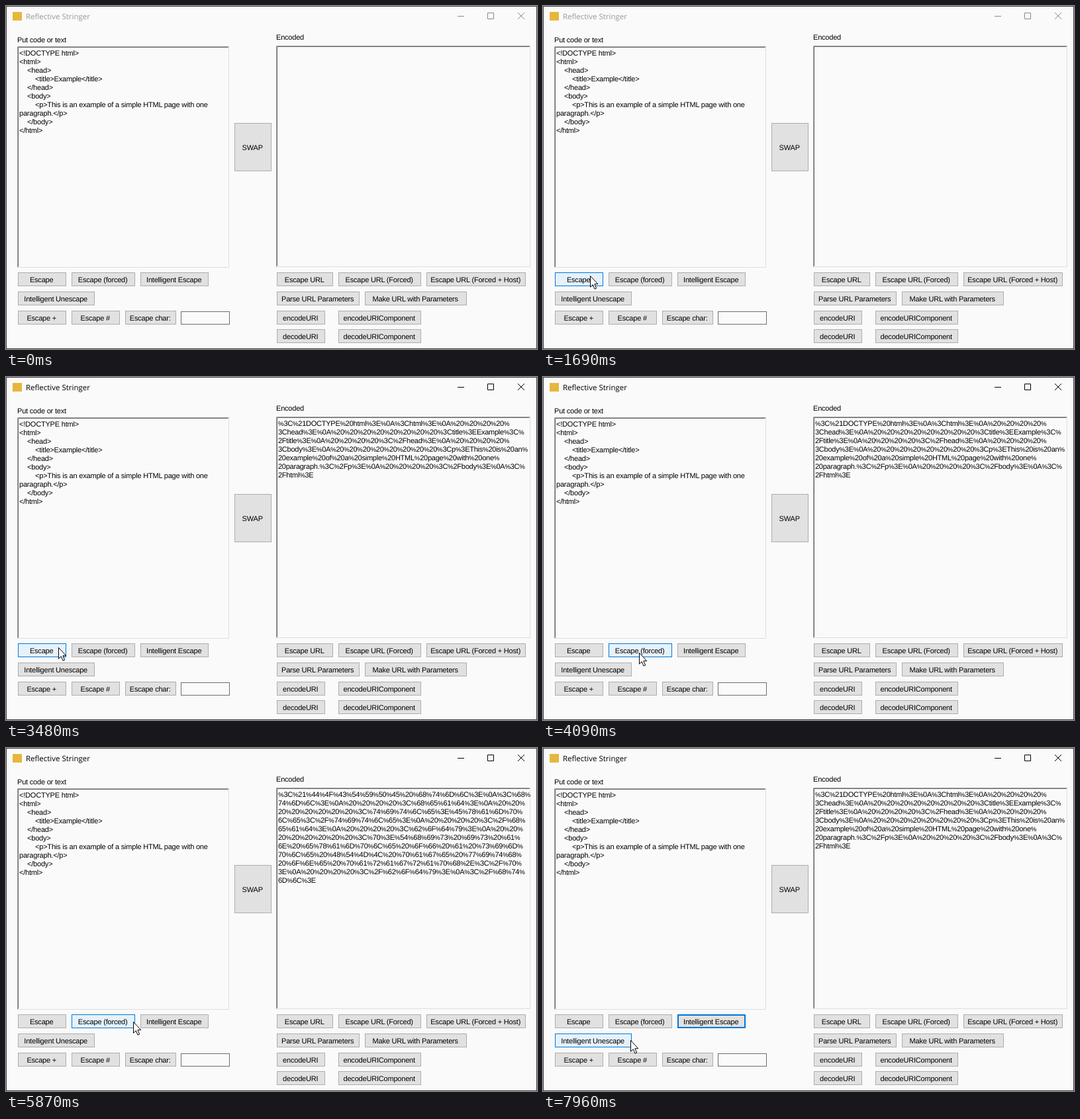
Write an HTML page that moves like this. It is 802 by 519 pixels and loops after 8000 ms.

```html
<!DOCTYPE html>
<html lang="en">
<head>
<meta charset="utf-8">
<title>Reflective Stringer</title>
<style>
html, body { margin: 0; width: 100%; height: 100%; overflow: hidden; background: #fafafa; }
svg { display: block; }
text {
  font: 11px "Liberation Sans", Arial, sans-serif;
  letter-spacing: -.2px;
  white-space: pre;
  text-rendering: geometricPrecision;
}
.output { letter-spacing: -.25px; }
.percent { font-size: 9.7px; }
.caption { font: 11.5px "Open Sans", sans-serif; letter-spacing: 0; }
.middle { text-anchor: middle; }
</style>
</head>
<body>
<svg id="stage" width="802" height="519" viewBox="0 0 802 519"></svg>
<script>
const stage = document.getElementById("stage");
const LOOP = 8000, SAMPLE = 78, PITCH = 13, GAP = 8;

function set(node, attrs) {
  for (const key in attrs) node.setAttribute(key, attrs[key]);
}
function add(tag, attrs, parent = stage) {
  const node = document.createElementNS("http://www.w3.org/2000/svg", tag);
  set(node, attrs);
  return parent.appendChild(node);
}
function label(x, y, content, className = "", parent = stage) {
  const node = add("text", { x, y, class: className }, parent);
  // Percent signs are set a little smaller than the other characters.
  for (const part of content.split(/(%)/)) {
    if (part === "%") add("tspan", { class: "percent" }, node).textContent = part;
    else node.append(part);
  }
  return node;
}
function show(node, visible) {
  node.style.display = visible ? "" : "none";
}

// Window frame and caption
add("rect", { x: .5, y: .5, width: 801, height: 518, fill: "#fafafa", stroke: "#3f3f3f" });
add("rect", { x: 10, y: 9, width: 14, height: 13, fill: "#e6b73c" });
const caption = label(30, 20, "Reflective Stringer", "caption");
const controls = add("path", {
  d: "M682 15.5h10M727.5 10.5h9v9h-9zM773 10l10 10m0 -10l-10 10",
  fill: "none"
});

// Text boxes
const boxes = [
  { x: 17, y: 61, w: 320, h: 335 },
  { x: 408, y: 60, w: 384, h: 335 }
];
for (const { x, y, w, h } of boxes) {
  const right = x + w - .5, bottom = y + h - .5;
  const bevel = (d, stroke) => add("path", { d, stroke, fill: "none" });
  bevel(`M${right} ${y}V${bottom}H${x}`, "#dedede");
  bevel(`M${x + .5} ${bottom}V${y + .5}H${right}`, "#a0a0a0");
  bevel(`M${x + 1.5} ${bottom - 1}V${y + 1.5}H${right - 1}`, "#696969");
}
add("rect", { x: 264.5, y: 462.5, width: 73, height: 19, fill: "#fafafa", stroke: "#6e6e6e" });
label(17, 55, "Put code or text");
label(408, 51, "Encoded");

const page = `<!DOCTYPE html>
<html>
    <head>
        <title>Example</title>
    </head>
    <body>
        <p>This is an example of a simple HTML page with one paragraph.</p>
    </body>
</html>`;

page.replace("one ", "one\n").split("\n").forEach((line, row) => {
  const code = line.trimStart();
  label(20 + 3 * (line.length - code.length), 75 + row * PITCH, code);
});

// Encoded text wraps after a percent sign.
const hex = c => c.charCodeAt(0).toString(16).toUpperCase().padStart(2, "0");
const escaped = page.replace(/[^\w.]/g, c => "%" + hex(c))
  .replace(/%(?=3Chead|2Ftitle|3Cbody|20example|20paragraph|2Fhtml)/g, "%\n");
const forced = page.replace(/[^]/g, (c, i) => (i && i % 18 === 0 ? "%\n" : "%") + hex(c));

function output(content) {
  const group = add("g", {});
  content.split("\n").forEach((line, row) => label(411, 74 + row * PITCH, line, "output", group));
  return group;
}
const escapedOutput = output(escaped), forcedOutput = output(forced);

// Buttons, laid out in rows from left to right
const buttons = [];
function buttonRow(x, y, widths, h = 21) {
  for (const [content, w] of Object.entries(widths)) {
    const face = add("rect", {});
    label(x + w / 2 - .8, y + h / 2 + 4.3, content, "middle");
    buttons.push({ x, y, w, h, face, content });
    x += w + GAP;
  }
}
buttonRow(345, 177, { "SWAP": 56 }, 73);
buttonRow(18, 403, { "Escape": 73, "Escape (forced)": 96, "Intelligent Escape": 103 });
buttonRow(18, 432, { "Intelligent Unescape": 116 });
buttonRow(18, 461, { "Escape +": 73, "Escape #": 73, "Escape char:": 77 });
buttonRow(409, 403, { "Escape URL": 85, "Escape URL (Forced)": 125, "Escape URL (Forced + Host)": 150 });
buttonRow(409, 432, { "Parse URL Parameters": 125, "Make URL with Parameters": 154 });
["encode", "decode"].forEach((verb, i) => {
  buttonRow(409, 461 + 28 * i, { [verb + "URI"]: 73 });
  buttonRow(502, 461 + 28 * i, { [verb + "URIComponent"]: 125 });
});

// Pointer
const arrow = add("path", {
  d: "M.5 .5V17.3L4.3 13.7L7 20.2L9.6 19.1L6.9 12.7H11.8Z",
  fill: "#fff", stroke: "#000"
});
const beam = add("path", {
  d: "M-3 -7.5H-.5M.5 -7.5H3M0 -7V7M-3 7.5H-.5M.5 7.5H3",
  fill: "none", stroke: "#000"
});

const linear = u => u;
const smooth = u => u * u * (3 - 2 * u);
const accelerate = u => u ** 1.5;

// Each move starts where the one before it ended; bend is a curve's control point.
const entry = [516, 471];
const moves = [
  { start: 210, end: 530, to: [380, 185], bend: [362, 202], ease: linear },
  { start: 600, end: 680, to: [375, 185], ease: linear },
  { start: 770, end: 1520, to: [78, 404], ease: smooth },
  { start: 1530, end: 1690, to: [71, 408], ease: linear },
  { start: 3400, end: 3790, to: [145, 417], ease: smooth },
  { start: 5020, end: 5180, to: [153, 415], ease: linear },
  { start: 5560, end: 6100, to: [243, 413], ease: accelerate },
  { start: 7580, end: 7960, to: [132, 442], ease: smooth }
];

function pointerAt(t) {
  const index = moves.findLastIndex(m => m.start <= t);
  if (index < 0) return null;
  const { start, end, to, bend, ease } = moves[index];
  const from = index ? moves[index - 1].to : entry;
  // The pointer jumps from sample to sample.
  const count = Math.round((end - start) / SAMPLE);
  const progress = Math.min(1, (t - start) / (end - start));
  const u = ease(Math.floor(progress * count + 1e-6) / count);
  return from.map((a, axis) => {
    const b = to[axis], mid = bend ? bend[axis] : (a + b) / 2;
    return Math.round((1 - u) ** 2 * a + 2 * u * (1 - u) * mid + u * u * b);
  });
}

const clicks = [
  { content: "Escape", down: 2160, up: 2240 },
  { content: "Escape (forced)", down: 4020, up: 4090 },
  { content: "Intelligent Escape", down: 6250, up: 6330 }
];

const over = (point, { x, y, w, h }) => point &&
  point[0] >= x && point[0] < x + w && point[1] >= y && point[1] < y + h;

function faceStyle(hovered, focused, pressed) {
  if (pressed) return ["#cce4f7", "#005499", 1];
  if (hovered) return ["#e5f1fb", "#0078d7", 1];
  return focused ? ["#e1e1e1", "#0078d7", 2] : ["#e1e1e1", "#adadad", 1];
}

function draw(t) {
  const point = pointerAt(t);
  const click = clicks.findLast(c => c.down <= t);

  const overText = boxes.some(box => over(point, box));
  show(arrow, point && !overText);
  show(beam, overText);
  if (point) set(overText ? beam : arrow, { transform: `translate(${point})` });

  for (const b of buttons) {
    const focused = click && click.content === b.content;
    const [fill, stroke, line] = faceStyle(over(point, b), focused, focused && t < click.up);
    set(b.face, {
      x: b.x + line / 2, y: b.y + line / 2, width: b.w - line, height: b.h - line,
      fill, stroke, "stroke-width": line
    });
  }

  set(caption, { fill: click ? "#000" : "#999" });
  set(controls, { stroke: click ? "#000" : "#888" });
  const forcedShown = t >= 4170 && t < 6330;
  show(escapedOutput, t >= 2240 && !forcedShown);
  show(forcedOutput, forcedShown);
}

const start = performance.now();
function tick() {
  draw((performance.now() - start) % LOOP);
  requestAnimationFrame(tick);
}
tick();
</script>
</body>
</html>
```
